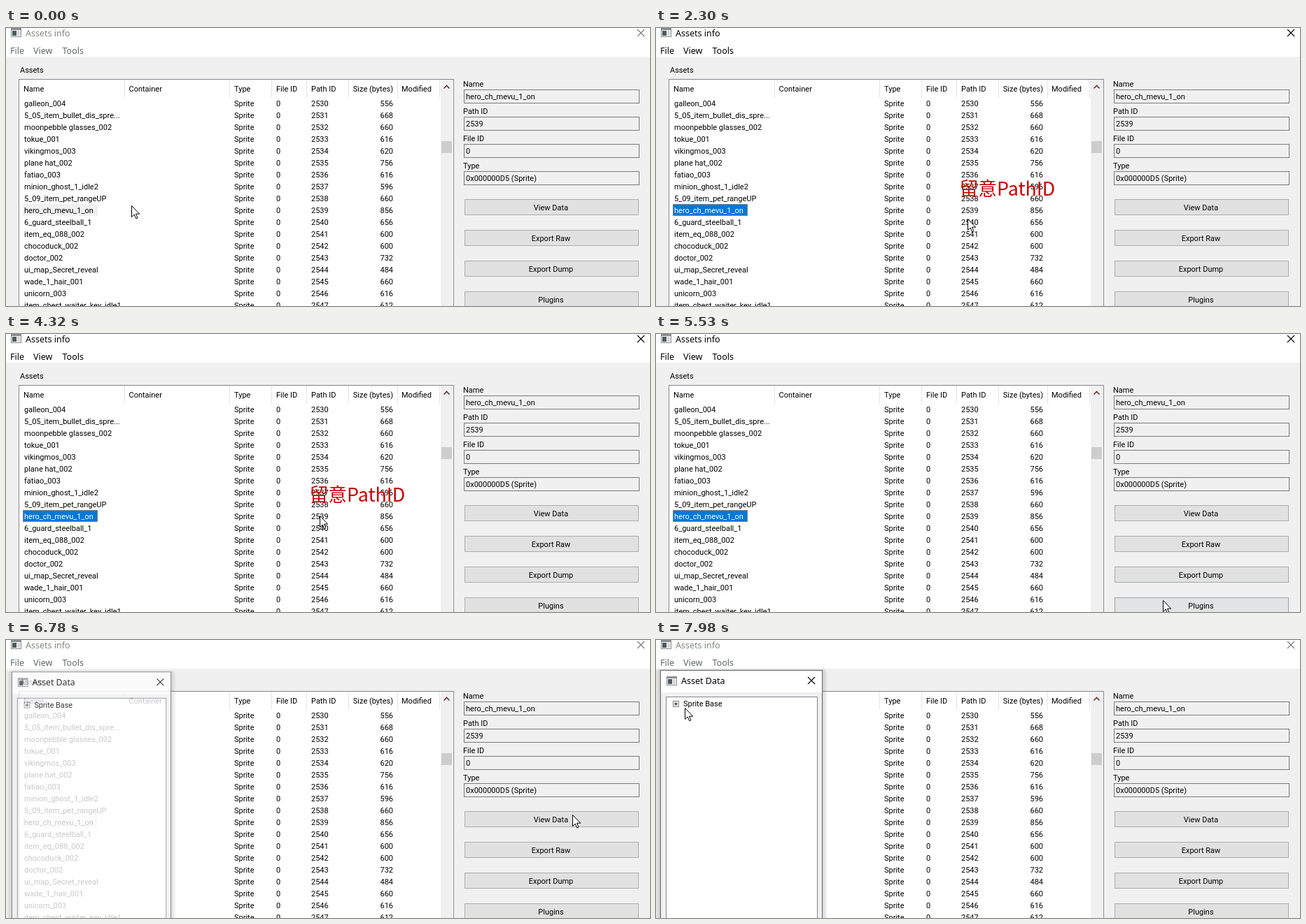
Write an HTML page that moves like this. It is 920 px wide and 398 px high and loops after 8 s.

```html
<!DOCTYPE html>
<html lang="en">
<head>
<meta charset="utf-8">
<title>Assets info</title>
<style>
  html, body { margin: 0; width: 100%; height: 100%; overflow: hidden; background: #f0f0f0; }
  svg { display: block; width: 920px; height: 398px; }
  text { font: 11px Roboto, "Liberation Sans", sans-serif; white-space: pre; }
  .ui { font: 12.5px "Noto Sans", "Open Sans", sans-serif; }
  .note { font: 500 26.8px "Noto Sans CJK SC", "Noto Sans CJK", "Noto Sans", sans-serif; fill: #c80000; }
</style>
</head>
<body>
<svg id="stage" viewBox="0 0 920 398"></svg>
<script>
const LOOP = 8000;
const stage = document.getElementById('stage');

function add(parent, tag, attrs = {}, content) {
  const node = document.createElementNS('http://www.w3.org/2000/svg', tag);
  for (const key in attrs) node.setAttribute(key, attrs[key]);
  if (content !== undefined) node.textContent = content;
  parent.appendChild(node);
  return node;
}
const fillRect = (p, x, y, width, height, fill) => add(p, 'rect', { x, y, width, height, fill });
const frame = (p, x, y, w, h, fill, stroke) =>
  add(p, 'rect', { x: x + .5, y: y + .5, width: w - 1, height: h - 1, fill, stroke });
const label = (p, x, y, content, attrs = {}) => add(p, 'text', { x, y, ...attrs }, content);
const line = (p, d, stroke, width = 1) =>
  add(p, 'path', { d, stroke, 'stroke-width': width, fill: 'none' });
const cross = (p, x, y) => line(p, `M${x} ${y}l10 10m0-10l-10 10`, '#000', 1.1);

function windowIcon(p, x, y) {
  frame(p, x, y, 15, 13, '#f4f4f4', '#8a8a8a');
  fillRect(p, x + 1, y + 1, 13, 2, '#8a9299');
  fillRect(p, x + 2, y + 4, 6, 7, '#4d5961');
  fillRect(p, x + 9, y + 4, 4, 7, '#d4d8da');
}

// Main window
fillRect(stage, 0, 0, 920, 398, '#f0f0f0');
fillRect(stage, 0, 0, 920, 41, '#fff');
windowIcon(stage, 7, 0);
const title = label(stage, 28, 12, 'Assets info', { class: 'ui' });
const menu = [[6, 'File'], [39, 'View'], [80.5, 'Tools']]
  .map(([x, name]) => label(stage, x, 37, name, { class: 'ui' }));
const mainClose = cross(stage, 902, 2);
label(stage, 20, 64, 'Assets');

// Asset table
frame(stage, 18, 73, 622, 340, '#fff', '#828790');
for (const x of [169, 319, 379, 429, 489, 559, 619]) fillRect(stage, x, 74, 1, 26, '#e5e5e5');
[[25, 'Name'], [175.5, 'Container'], [326, 'Type'], [386, 'File ID'], [436, 'Path ID'], [565, 'Modified']]
  .forEach(([x, name]) => label(stage, x, 91, name));
const rightAlign = { 'text-anchor': 'end' };
label(stage, 553, 91, 'Size (bytes)', rightAlign);
fillRect(stage, 621, 74, 17, 324, '#f0f0f0');
fillRect(stage, 622, 162, 15, 17, '#cdcdcd');
line(stage, 'M625.5 86.5l4-4 4 4', '#6b3030', 1.6);

const selected = fillRect(stage, 24, 252, 107, 17);
const focusRing = frame(stage, 24, 252, 107, 17, 'none', '#ff8728');
focusRing.setAttribute('stroke-dasharray', '1 1');
const ASSETS = [
  ['galleon_004', 556], ['5_05_item_bullet_dis_spre...', 668], ['moonpebble glasses_002', 660],
  ['tokue_001', 616], ['vikingmos_003', 620], ['plane hat_002', 756], ['fatiao_003', 616],
  ['minion_ghost_1_idle2', 596], ['5_09_item_pet_rangeUP', 660], ['hero_ch_mevu_1_on', 856],
  ['6_guard_steelball_1', 656], ['item_eq_088_002', 600], ['chocoduck_002', 600],
  ['doctor_002', 732], ['ui_map_Secret_reveal', 484], ['wade_1_hair_001', 660],
  ['unicorn_003', 616], ['item_chest_waiter_key_idle1', 612]
];
const PICK = 9;
const nameCells = ASSETS.map(([name, size], i) => {
  const y = 112 + 17 * i;
  label(stage, 326, y, 'Sprite');
  label(stage, 386, y, '0');
  label(stage, 436, y, 2530 + i);
  label(stage, 553, y, size, rightAlign);
  return label(stage, 26, y, name);
});

// Details and buttons
[['Name', ASSETS[PICK][0]], ['Path ID', '2539'], ['File ID', '0'], ['Type', '0x000000D5 (Sprite)']]
  .forEach(([name, value], i) => {
    const y = 39 * i;
    label(stage, 653, 84 + y, name);
    frame(stage, 654, 88 + y, 251, 20, '#f0f0f0', '#7a7a7a');
    label(stage, 657, 102 + y, value);
  });
const BUTTON_HEIGHT = 23;
const buttons = ['View Data', 'Export Raw', 'Export Dump', 'Plugins'].map((name, i) => {
  const y = 245 + 44 * i;
  frame(stage, 655, y, 249, BUTTON_HEIGHT, '#e1e1e1', '#adadad');
  const glow = frame(stage, 655, y, 249, BUTTON_HEIGHT, '#e5f1fb', '#3c7fb1');
  label(stage, 778.5, y + 16, name, { 'text-anchor': 'middle' });
  return { y, glow };
});

const note = label(stage, 433.5, 239.5, '留意PathID', { class: 'note' });

// Data dialog
const dialog = add(stage, 'g');
for (let i = 1; i <= 7; i++)
  add(dialog, 'rect', { x: 6 - i, y: 44 - i / 2, width: 232 + 2 * i, height: 400, rx: i, fill: '#000', opacity: .025 });
frame(dialog, 6, 43, 232, 400, '#f0f0f0', '#666');
fillRect(dialog, 7, 44, 230, 31, '#fff');
windowIcon(dialog, 15, 52);
label(dialog, 36, 63, 'Asset Data', { class: 'ui' });
cross(dialog, 217, 53);
frame(dialog, 14, 81, 217, 360, '#fff', '#828790');
frame(dialog, 24, 87, 9, 9, '#fff', '#848484');
line(dialog, 'M26 91.5h5m-2.5-2.5v5', '#222');
label(dialog, 39, 95, 'Sprite Base');

const pointer = add(stage, 'path', {
  d: 'M.5.5v16l3.7-3.5 2.5 5.8 2.3-1-2.5-5.6h5.2z', fill: '#fff', stroke: '#000', 'stroke-linejoin': 'round'
});

// Pointer stops: time, x, y
const PATH = [
  [0, 179, 254], [180, 179, 254], [280, 184, 256], [590, 184, 256], [1080, 112, 259],
  [1510, 112, 259], [1990, 445, 273], [2300, 445, 273], [2350, 451, 273], [2580, 451, 273],
  [2810, 467, 267], [2960, 467, 267], [3100, 440, 261], [3200, 429, 261], [3380, 429, 261],
  [3800, 465, 255], [4140, 459, 253], [4190, 459, 253], [4420, 441, 264], [4600, 441, 264],
  [4750, 454, 268], [4900, 454, 268], [5680, 752, 393], [5730, 752, 393], [6180, 814, 239],
  [6400, 809, 250], [6830, 809, 250], [7290, 225, 193], [7470, 225, 193], [7960, 41, 97]
];
const clamp = v => Math.min(1, Math.max(0, v));
const smooth = u => u * u * (3 - 2 * u);

function pointerAt(t) {
  const next = PATH.findIndex(stop => stop[0] > t);
  if (next < 1) return PATH[next < 0 ? PATH.length - 1 : 0].slice(1);
  const [t0, x0, y0] = PATH[next - 1], [t1, x1, y1] = PATH[next];
  const k = smooth((t - t0) / (t1 - t0));
  return [x0 + (x1 - x0) * k, y0 + (y1 - y0) * k];
}

// Share of the last 200 ms that the pointer spent on a button
function hover(y, t) {
  let hits = 0;
  for (let i = 0; i < 20; i++) {
    const [px, py] = pointerAt(Math.max(0, t - i * 10));
    if (px >= 655 && px < 904 && py >= y && py < y + BUTTON_HEIGHT) hits++;
  }
  return hits / 20;
}

function draw(t) {
  const active = t >= 1080 && t < 6600;
  const focused = t >= 1080 && t < 6500;
  title.setAttribute('fill', active ? '#000' : '#7d887f');
  menu.forEach(item => item.setAttribute('fill', active ? '#000' : '#5c6b62'));
  mainClose.setAttribute('stroke', active ? '#000' : '#777');

  selected.setAttribute('fill', focused ? '#0078d7' : '#f0f0f0');
  focusRing.setAttribute('visibility', focused ? 'visible' : 'hidden');
  nameCells[PICK].setAttribute('fill', focused ? '#fff' : '#000');

  buttons.forEach(({ y, glow }) => glow.setAttribute('opacity', t < 6550 ? hover(y, t) : 0));
  buttons[0].glow.setAttribute('fill', t >= 6500 ? '#cce4f7' : '#e5f1fb');
  note.setAttribute('visibility', t >= 1800 && t < 4960 ? 'visible' : 'hidden');

  const open = 1 - (1 - clamp((t - 6700) / 200)) ** 3;
  dialog.setAttribute('opacity', open);
  dialog.setAttribute('transform', `translate(122 190) scale(${.92 + .08 * open}) translate(-122 -190)`);

  const [x, y] = pointerAt(t);
  pointer.setAttribute('transform', `translate(${Math.round(x)} ${Math.round(y)})`);
}

const start = performance.now();
function tick() {
  draw((performance.now() - start) % LOOP);
  requestAnimationFrame(tick);
}
tick();
</script>
</body>
</html>
```
